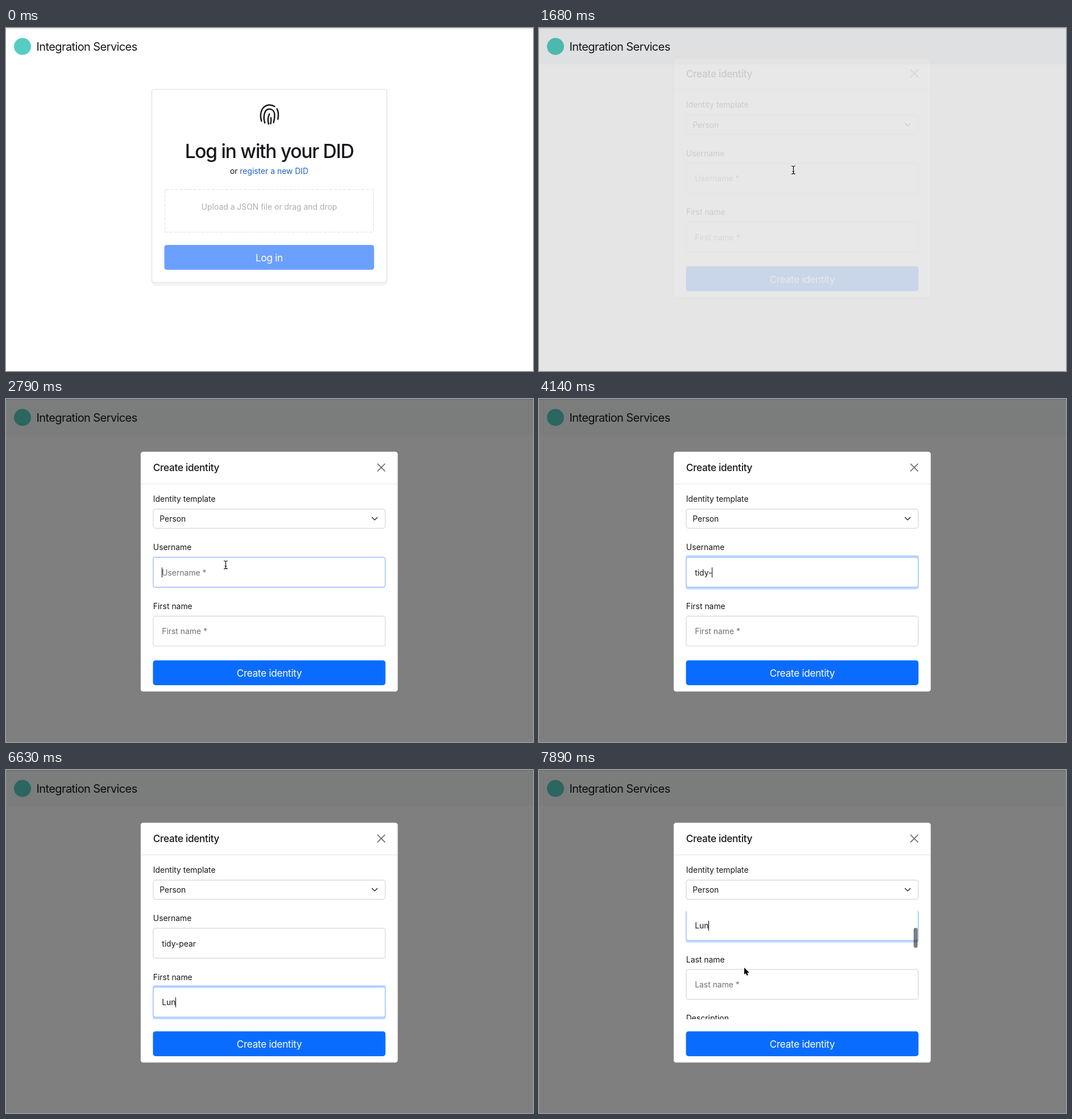
Animation of 927x604 px, one loop 8000 ms. Source, as an HTML page with a canvas:

```html
<!DOCTYPE html>
<html lang="en">
<head>
<meta charset="utf-8">
<title>Create identity</title>
<style>
html, body { margin: 0; width: 100%; height: 100%; overflow: hidden; background: #fff; }
canvas { display: block; width: 927px; height: 604px; }
</style>
</head>
<body>
<canvas id="stage" width="927" height="604"></canvas>
<script>
const W = 927, H = 604, LOOP = 8000, STEP = 30;
const stage = document.getElementById('stage').getContext('2d');
const layer = Object.assign(document.createElement('canvas'), { width: W, height: H }).getContext('2d');
let ctx = stage;

const INK = '#16181b', MUTED = '#6d7176', BLUE = '#0a6cff', LINE = '#d3d6da';
const BODY = 13.9, LARGE = 17.2, TIGHT = -0.018;

const OPEN = 1644, FOCUS_USER = 2730, FOCUS_FIRST = 5960, SCROLL = 7440;
const USER = { text: 'tidy-pear', keys: [3120, 3420, 3690, 3900, 4110, 4590, 4740, 4890, 4980] };
const FIRST = { text: 'Lun', keys: [6240, 6420, 6630] };

// Pointer stops: time, x, y
const PATH = [
  [30, 520, 580], [1260, 447, 250], [2040, 447, 250], [2640, 386, 292],
  [5300, 386, 292], [5520, 394, 358], [5820, 400, 402], [6830, 400, 402], [7300, 361, 348]
];

const clamp = v => Math.max(0, Math.min(1, v));
const ramp = (t, start, length) => clamp((t - start) / length);
const smooth = u => u * u * (3 - 2 * u);

// cubic-bezier(0, 0, .58, 1)
function easeOut(u) {
  let lo = 0, hi = 1;
  for (let i = 0; i < 24; i++) {
    const s = (lo + hi) / 2;
    if (1.74 * (1 - s) * s * s + s ** 3 < u) lo = s; else hi = s;
  }
  return 3 * (1 - lo) * lo * lo + lo ** 3;
}

function text(str, x, y, { size = BODY, color = INK, weight = 400, align = 'left', track = 0 } = {}) {
  ctx.font = `${weight} ${size}px Inter, Roboto, sans-serif`;
  ctx.letterSpacing = `${size * track}px`;
  ctx.textAlign = align;
  ctx.fillStyle = color;
  ctx.fillText(str, x, y);
}

function box(x, y, w, h, r, fill, stroke) {
  ctx.beginPath();
  ctx.roundRect(x, y, w, h, r);
  if (fill) { ctx.fillStyle = fill; ctx.fill(); }
  if (stroke) { ctx.strokeStyle = stroke; ctx.lineWidth = 1.2; ctx.stroke(); }
}

function strokePath(d, color, width) {
  ctx.strokeStyle = color;
  ctx.lineWidth = width;
  ctx.lineCap = ctx.lineJoin = 'round';
  ctx.stroke(new Path2D(d));
}

function navbar(fill) {
  ctx.fillStyle = fill;
  ctx.fillRect(0, 0, W, 64);
  ctx.fillStyle = '#56cdc2';
  ctx.beginPath();
  ctx.arc(29, 32.5, 15, 0, 7);
  ctx.fill();
  text('Integration Services', 53.5, 39.8, { size: 20, track: -0.03 });
}

function fingerprint() {
  [
    'M449.5 164C447.6 158 447.5 153 448.5 149C450.5 140 457 135.5 463.5 135.5C467 135.5 470 136.5 472.5 138.3',
    'M476.6 142.5C479.5 147.5 479.6 153.5 478.3 160.5',
    'M455.3 167C453 160 453.5 155.5 454.6 151C456 145.5 459.5 142.8 463.3 142.8C468.5 142.8 472 146.5 472.4 152C472.7 157.5 472 162 470.6 166.5',
    'M462 169C460.2 163 460.2 158 463.3 151.5',
    'M466 158C466.5 162 466.3 165 465.6 168.5'
  ].forEach(d => strokePath(d, INK, 2.5));
}

function loginCard() {
  box(256, 116, 415, 338, 8, '#f3f3f3');
  box(256.5, 108, 413.5, 340, 4, '#fff', '#dedede');
  fingerprint();
  text('Log in with your DID', 463, 229, { size: 33.5, weight: 500, align: 'center', track: -0.037 });
  text('or ', 394, 256.5);
  text('register a new DID', 411.3, 256.5, { color: '#1f62c6' });
  ctx.setLineDash([5, 3]);
  box(279.5, 284.5, 367, 75, 2, null, '#e3e3e3');
  ctx.setLineDash([]);
  text('Upload a JSON file or drag and drop', 463, 320, { color: '#adadad', align: 'center' });
  box(278.5, 382, 369, 43.8, 4.5, '#6ba0ff');
  text('Log in', 463, 410.8, { size: LARGE, color: '#fff', align: 'center', track: TIGHT });
}

const typed = (entry, t) => entry.text.slice(0, entry.keys.filter(k => k <= t).length);

function caretOn(t, entry, focus) {
  const last = [focus, ...entry.keys].filter(k => k <= t).pop();
  return Math.floor((t - last) / 500) % 2 === 0;
}

function field(index, label, value, ring, caret) {
  const y = 278.7 + index * 103.7;
  text(label, 258.8, y - 12.6);
  if (ring > 0) {
    const s = 3.6 * ring;
    box(258.5 - s, y - s, 409 + 2 * s, 53 + 2 * s, 4 + s, `rgba(13,110,253,${0.25 * ring})`);
  }
  box(258.9, y, 408.2, 52.6, 4, '#fff', ring > 0.3 ? '#8fb9f5' : LINE);
  if (value) text(value, 274.2, y + 31.8);
  else text(label + ' *', 274.2, y + 31.8, { color: MUTED });
  if (caret) {
    ctx.font = `400 ${BODY}px Inter, Roboto, sans-serif`;
    ctx.letterSpacing = '0px';
    ctx.fillStyle = '#000';
    ctx.fillRect(Math.round(274 + ctx.measureText(value).width), y + 18, 1, 17.5);
  }
}

function form(t) {
  const scroll = t < SCROLL ? 0 : 135 * smooth(ramp(t, 7380, 510));
  const toFirst = smooth(ramp(t, FOCUS_FIRST, 150));
  const userRing = smooth(ramp(t, FOCUS_USER, 150)) * (1 - toFirst);
  const onFirst = t >= FOCUS_FIRST;
  const onUser = t >= FOCUS_USER && !onFirst;

  ctx.save();
  ctx.beginPath();
  ctx.rect(258, 249, 410, 190);
  ctx.clip();
  ctx.translate(0, -scroll);
  field(0, 'Username', typed(USER, t), userRing, onUser && caretOn(t, USER, FOCUS_USER));
  field(1, 'First name', typed(FIRST, t), toFirst, onFirst && caretOn(t, FIRST, FOCUS_FIRST));
  field(2, 'Last name', '', 0, false);
  field(3, 'Description', '', 0, false);
  ctx.restore();

  if (scroll > 0) box(659, 250.8 + scroll * 0.202, 7, 35, 3, 'rgba(0,0,0,.5)');
}

function dialog(t) {
  ctx.save();
  ctx.translate(0, -50 * (1 - easeOut(ramp(t, OPEN, 300))));
  box(236.6, 92.6, 452.8, 422.8, 4.5, '#fff', 'rgba(0,0,0,.2)');
  text('Create identity', 258.8, 127.2, { size: LARGE, weight: 500, track: TIGHT });
  strokePath('M653.8 114.3L666.4 126.9M666.4 114.3L653.8 126.9', '#6f6f6f', 1.7);
  ctx.fillStyle = '#e2e4e6';
  ctx.fillRect(237, 149, 452, 1);
  text('Identity template', 258.8, 180.6);
  box(258.9, 193.8, 408.2, 33.8, 4, '#fff', LINE);
  text('Person', 270.3, 216);
  strokePath('M644 208.6L648.5 213L653 208.6', '#343a40', 1.5);
  form(t);
  box(258.5, 460.2, 409, 43.7, 4.5, BLUE);
  text('Create identity', 463, 489, { size: LARGE, color: '#fff', align: 'center', track: TIGHT });
  ctx.restore();
}

// Draws the dialog on its own layer so that it fades as one piece
function modal(t) {
  ctx = layer;
  ctx.clearRect(0, 0, W, H);
  dialog(t);
  ctx = stage;
  ctx.globalAlpha = ramp(t, 1664, 130);
  ctx.drawImage(layer.canvas, 0, 0);
  ctx.globalAlpha = 1;
}

function pointerAt(t) {
  let i = PATH.findIndex(p => p[0] > t);
  if (i < 0) i = PATH.length;
  const a = PATH[Math.max(0, i - 1)], b = PATH[Math.min(i, PATH.length - 1)];
  const u = a === b ? 0 : smooth(ramp(t, a[0], b[0] - a[0]));
  return [a[1] + (b[1] - a[1]) * u, a[2] + (b[2] - a[2]) * u];
}

const ARROW = new Path2D('M0 0V12.3L2.8 9.8L4.7 14L6.9 13L5 8.9H8.9Z');
const HAND = new Path2D('M-1.2 .8Q0 -.8 1.2 .8V6L7 7.2Q8.4 7.6 8.2 9L7.2 15H-.8L-5 9.6Q-5 7.6 -3.2 8.2L-1.2 9.8Z');
const BEAM = 'M-3 -7Q0 -7 0 -5Q0 -7 3 -7M0 -5V5M-3 7Q0 7 0 5Q0 7 3 7M-1.5 2.5H1.5';

function pointer(t) {
  const typing = (t >= USER.keys[0] && t < 5310) || (t >= FIRST.keys[0] && t < 6840);
  if (t < 30 || typing) return;
  const [x, y] = pointerAt(t);
  const inField = (y > 279 && y < 332) || (y > 383 && y < 435);
  const beam = t >= OPEN && (t < 2050 || inField);
  const hand = t < OPEN && y < 260;

  ctx.save();
  if (beam) {
    ctx.translate(x + 0.5, y);
    strokePath(BEAM, 'rgba(255,255,255,.6)', 2.2);
    strokePath(BEAM, '#000', 1.1);
  } else {
    const shape = hand ? HAND : ARROW;
    ctx.translate(x, y);
    ctx.lineJoin = 'round';
    ctx.lineWidth = 2;
    ctx.strokeStyle = '#fff';
    ctx.fillStyle = '#000';
    ctx.stroke(shape);
    ctx.fill(shape);
  }
  ctx.restore();
}

function draw(t) {
  const open = t >= OPEN;
  ctx.fillStyle = '#fff';
  ctx.fillRect(0, 0, W, H);
  navbar(open ? '#f8f9fa' : '#fff');
  if (open) {
    ctx.fillStyle = `rgba(0,0,0,${0.5 * ramp(t, 1650, 150)})`;
    ctx.fillRect(0, 0, W, H);
    modal(t);
  } else {
    loginCard();
  }
  ctx.fillStyle = 'rgba(0,0,0,.15)';
  ctx.fillRect(0, 0, W, 1);
  pointer(t);
}

function tick() {
  const t = performance.now() % LOOP;
  draw(Math.floor(t / STEP) * STEP);
  requestAnimationFrame(tick);
}
tick();
</script>
</body>
</html>
```
